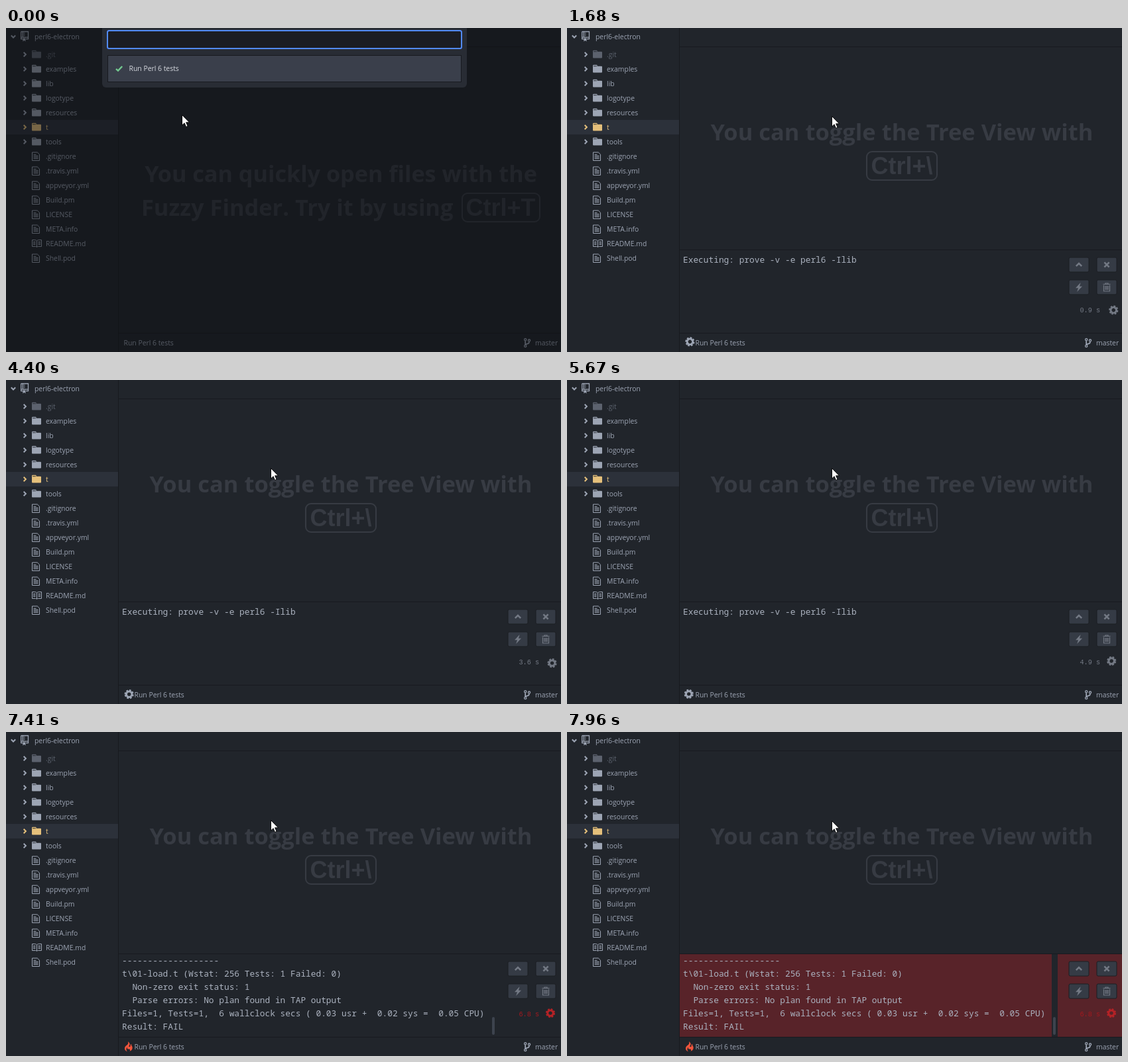
An HTML page for the animation above (8000 ms loop, 837x490 px).

```html
<!DOCTYPE html>
<html lang="en">
<head>
<meta charset="utf-8">
<title>Running tests</title>
<style>
html, body { margin: 0; width: 100%; height: 100%; overflow: hidden; background: #21252b; }
svg { display: block; }
text { white-space: pre; }
.ui { font: 10.4px "Open Sans", "Noto Sans", sans-serif; fill: #9da5b4; }
.mono { font: 12.83px "Noto Sans Mono", "DejaVu Sans Mono", monospace; fill: #abb2bf; }
.time { font: 10.2px "Liberation Mono", monospace; }
.tip { font: bold 34.2px "Open Sans", "Noto Sans", sans-serif; fill: #373b43; }
.tip .key { font: bold 36px "Liberation Sans", sans-serif; }
.tip rect { fill: none; stroke: #373b43; stroke-width: 2; }
.line { fill: none; stroke: #9da5b4; }
.btn rect { fill: #353b45; stroke: #1b1e23; }
.btn .line { stroke: #737984; }
</style>
</head>
<body>
<svg id="stage" width="837" height="490" viewBox="0 0 837 490"></svg>
<script>
const LOOP = 8000, OPEN = 960, DONE = 7410;
const $ = id => document.getElementById(id);

const rect = (x, y, w, h, fill, extra = '') =>
  `<rect x="${x}" y="${y}" width="${w}" height="${h}" fill="${fill}" ${extra}/>`;
const text = (x, y, s, cls = 'ui', extra = '') =>
  `<text x="${x}" y="${y}" class="${cls}" ${extra}>${s}</text>`;
const line = (d, w = 1, extra = '') =>
  `<path class="line" d="${d}" stroke-width="${w}" ${extra}/>`;
const at = (x, y, body, extra = '') => `<g transform="translate(${x} ${y})" ${extra}>${body}</g>`;

const chevron = line('M26.7 -3.2 L29.9 0 L26.7 3.2', 2);
const folder = color =>
  `<path d="M39 -5.2 q0 -1 1 -1 h4.6 q1 0 1 1 v1 h6.4 q1 0 1 1 v7.6 q0 1 -1 1 h-12 q-1 0 -1 -1 z" fill="${color}"/>` +
  `<path d="M40 -4.3 h4.8" stroke="#21252b" stroke-width=".9"/>`;
const file = line('M39.5 -6 h7.8 l3.2 3.2 v9.3 h-11 z M41.5 -2.5 h4 M41.5 -.5 h7 M41.5 1.5 h7 M41.5 3.5 h7', 1);
const book = line('M46.5 -4 q-1.2 -1.5 -3 -1.5 h-4 v10 h5 q1.5 0 2 1 q.5 -1 2 -1 h5 v-10 h-4 q-1.8 0 -3 1.5 v9' +
  'M41 -2.5 h3.5 M41 -.5 h3.5 M41 1.5 h3.5 M48.5 -2.5 h3.5 M48.5 -.5 h3.5 M48.5 1.5 h3.5', 1);
const gear = '<circle r="4.2" fill="none" stroke="currentColor" stroke-width="3"/>' +
  '<circle r="5.9" fill="none" stroke="currentColor" stroke-width="2.4" stroke-dasharray="2.7 1.934"/>';

function tree() {
  const dirs = ['.git', 'examples', 'lib', 'logotype', 'resources', 't', 'tools'];
  const files = ['.gitignore', '.travis.yml', 'appveyor.yml', 'Build.pm', 'LICENSE', 'META.info', 'README.md', 'Shell.pod'];
  const tint = { '.git': '#5c626e', t: '#e5c07b' };
  return [...dirs, ...files].map((name, i) => {
    const isDir = i < dirs.length, c = tint[name] || '#9da5b4';
    const icon = isDir ? chevron + folder(c) : name === 'README.md' ? book : file;
    const style = tint[name] ? `style="fill:${c};--c:${c}"` : '';
    const row = at(0, 40 + 22 * i, icon + text(60, 4, name, 'ui', style), name === 't' ? 'id="picked"' : '');
    return (name === 't' ? rect(0, 139, 169, 22, '#2c313a') : '') + row;
  }).join('');
}

const repo = line('M22.7 5.5 h10.8 v11.2 h-3.5 M25.5 16.7 h-2.8 v-11.2 M25.4 5.5 v8.6 M22.7 14.1 h10.8', 1.3) +
  '<path d="M25.4 15.5 h4 v5 l-2 -1.8 -2 1.8 z" fill="#9da5b4"/>' +
  '<path d="M27 7.7h1.3M27 9.7h1.3M27 11.7h1.3" stroke="#9da5b4"/>';

const branch = line('M783.2 473.2 v5.6 M789 474.4 q0 2.6 -2.8 3.2 q-2.6 .5 -3 1.6', 1.8) +
  [[783.2, 471.3], [783.2, 481], [789, 472.6]].map(([x, y]) =>
    `<circle class="line" cx="${x}" cy="${y}" r="1.6" stroke-width="1.3"/>`).join('');

const flame = 'M5.05.31c.81 2.17.41 3.38-.52 4.31C3.55 5.67 1.98 6.45.9 7.98c-1.45 2.05-1.7 6.53 3.53 7.7' +
  '-2.2-1.16-2.67-4.52-.3-6.61-.61 2.03.53 3.33 1.94 2.86 1.39-.47 2.3.53 2.27 1.67-.02.78-.31 1.44-1.13 1.81 ' +
  '3.42-.59 4.78-3.42 4.78-5.56 0-2.84-2.53-3.22-1.25-5.61-1.52.13-2.03 1.13-1.89 2.75.09 1.08-1.02 1.8-1.86 1.33' +
  '-.67-.41-.66-1.19-.06-1.78C8.18 5.31 8.68 2.45 5.05.31z';

const key = (x, w, label, lx) => rect(x, 187, w, 43, 'none', 'rx="8"') + text(lx, 221, label, 'key');
const tips = `<g id="tipA" class="tip">
  ${text(505, 170, 'You can quickly open files with the', '', 'text-anchor="middle"')}
  ${text(204, 221, 'Fuzzy Finder. Try it by using', '', 'style="font-size:34.4px"')}
  ${key(688, 117, 'Ctrl+T', 693.5)}</g>
<g id="tipB" class="tip">
  ${text(505, 170, 'You can toggle the Tree View with', '', 'text-anchor="middle" style="font-size:34.5px"')}
  ${key(452, 106, 'Ctrl+\\', 458.5)}</g>`;

const button = (x, y, icon) => at(x, y, rect(-15, -11, 30, 22, '', 'rx="2"') + icon, 'class="btn"');
const buttons =
  button(772, 358, line('M-4.2 2.2 L0 -2 L4.2 2.2', 2.6)) +
  button(814, 358, line('M-3.6 -3.6 L3.6 3.6 M3.6 -3.6 L-3.6 3.6', 2.6)) +
  button(772, 392, '<path d="M2.6 -7 L-5 1.2 H-1 L-2.8 7 L5 -1.3 H1 z" fill="#737984"/>') +
  button(814, 392, line('M-5.5 -4.5 H5.5 M-2 -4.5 v-1.5 h4 v1.5 M-4.5 -3 V6 H4.5 V-3 M-2 -2 V4 M0 -2 V4 M2 -2 V4', 1.2));

const report = ['-------------------',
  't\\01-load.t (Wstat: 256 Tests: 1 Failed: 0)',
  '  Non-zero exit status: 1',
  '  Parse errors: No plan found in TAP output',
  'Files=1, Tests=1,  6 wallclock secs ( 0.03 usr +  0.02 sys =  0.05 CPU)',
  'Result: FAIL'].map((s, i) => text(175, 350 + 20 * i, s, 'mono')).join('');

const panel = `<g id="panel">
  <g id="alarm">${rect(170, 336, 561, 125, 'inherit')}${rect(740, 336, 97, 125, 'inherit')}</g>
  ${rect(170, 335, 667, 1, '#181a1f')}
  <g id="running">${text(175, 355, 'Executing: prove -v -e perl6 -Ilib', 'mono')}</g>
  <g id="report">${report}${rect(733, 431, 4, 27, '#3d434e', 'rx="2"')}</g>
  ${buttons}
  ${text(773.5, 430, '', 'time', 'id="clock"')}
  <g id="gearA">${gear}</g>
</g>`;

const modal = `<g id="modal">
  ${rect(0, 0, 837, 490, '#0d0f12', 'opacity=".5"')}
  ${rect(145, -10, 550, 100, '#282c34', 'rx="6"')}
  ${rect(153, 4, 534, 27, '#1b1d23', 'rx="2.5" stroke="#528bff" stroke-width="2"')}
  ${rect(161, 9, 1, 17, '#d7dae0', 'id="caret"')}
  ${rect(153.5, 41.5, 533, 40, '#3a3f4b', 'stroke="#181a1f"')}
  ${line('M166 61.8 L169 64.6 L175.2 58', 2.4, 'style="stroke:#73c990"')}
  ${text(185.5, 65, 'Run Perl 6 tests', 'ui', 'style="fill:#d7dae0"')}
</g>`;

$('stage').innerHTML = `
  ${rect(0, 0, 837, 490, '#21252b')}
  ${rect(170, 28, 667, 1, '#181a1f')}
  ${tree()}
  ${line('M7.8 11.3 L11 14.5 L14.2 11.3', 2)}${repo}${text(43, 17, 'perl6-electron')}
  <g id="tips">${tips}</g>
  ${panel}
  ${rect(169, 0, 1, 490, '#181a1f')}${rect(170, 461, 667, 1, '#181a1f')}
  <g id="gearB" color="#9da5b4">${gear}</g>
  <path id="flame" d="${flame}" fill="#f2553c" transform="translate(179 468) scale(.97)"/>
  ${text(177.5, 480, 'Run Perl 6 tests', 'ui', 'id="status"')}
  ${branch}${text(798, 480, 'master')}
  ${modal}
  <path id="cursor" d="M0 0 V15.6 L3.6 12.2 L6.1 18 L8.6 16.9 L6.1 11.3 H11 z" fill="#fff" stroke="#000" stroke-width=".9"/>`;
$('picked').querySelector('.line').style.stroke = '#e5c07b';

// Screen refreshes while the tests run: eight per group, with uneven gaps.
const knots = [[0, 960], [5, 1680], [7, 1930], [8, 2080], [15, 3010], [16, 3170], [23, 4100], [24, 4250],
  [25, 4400], [31, 5210], [32, 5370], [39, 6330], [40, 6450], [43, 6880], [47, 7410]];
const ticks = knots.slice(1).flatMap(([k1, t1], i) => {
  const [k0, t0] = knots[i];
  return Array.from({ length: k1 - k0 }, (_, j) => t0 + (t1 - t0) * j / (k1 - k0));
});
const lastTick = t => ticks.reduce((a, b) => b <= t + 0.5 ? b : a, OPEN);

// Mouse stops: time, x, y
const mouse = [[0, 265.5, 131.5], [140, 264, 125], [275, 259, 106], [410, 252, 83], [545, 247, 69], [680, 245.5, 66],
  [1104, 264, 76], [1248, 306, 95], [1392, 355, 116], [1536, 391, 130], [1680, 399.5, 133.5], [7960, 399.5, 134.5]];
// Tip fades: time, first tip, second tip
const fades = [[0, 1, 0], [1248, .5, 0], [1392, 0, .5], [1536, 0, 1]];
const hold = (table, t) => table.reduce((a, row) => row[0] <= t ? row : a);

const show = (id, on) => $(id).setAttribute('visibility', on ? 'inherit' : 'hidden');
const move = (id, s) => $(id).setAttribute('transform', s);

function draw(t) {
  const open = t >= OPEN, done = t >= DONE, spinning = open && !done;
  const now = lastTick(t);
  const turn = done ? 0 : (now - 800) / 2400 * 360;

  show('modal', !open);
  show('caret', t >= 410);
  show('panel', open);
  show('running', !done);
  show('report', open && done);
  show('gearB', spinning);
  show('flame', done);
  $('status').setAttribute('x', open ? 193.5 : 177.5);
  move('tips', `translate(0 ${open ? 0 : 63})`);

  const [, a, b] = hold(fades, t);
  $('tipA').setAttribute('opacity', a);
  $('tipB').setAttribute('opacity', b);

  // The gears spin about a point slightly off their centres.
  move('gearA', `translate(822.3 426.6) rotate(${turn}) translate(-1.3 -1.5)`);
  move('gearB', `translate(184.7 475.1) rotate(${turn}) translate(-1 -.1)`);
  $('gearA').setAttribute('color', done ? '#b52226' : '#737984');
  $('clock').setAttribute('fill', done ? '#a3191f' : '#737984');
  $('clock').textContent = (done ? '6.8' : (Math.floor((now - 795) * 1.02 / 100) / 10).toFixed(1)) + ' s';
  $('alarm').setAttribute('fill', t >= 7680 ? '#582329' : t >= 7530 ? '#3d2429' : '#21252b');

  const [, x, y] = hold(mouse, t);
  move('cursor', `translate(${x} ${y})`);
}

function frame() {
  draw(performance.now() % LOOP);
  requestAnimationFrame(frame);
}
frame();
</script>
</body>
</html>
```
